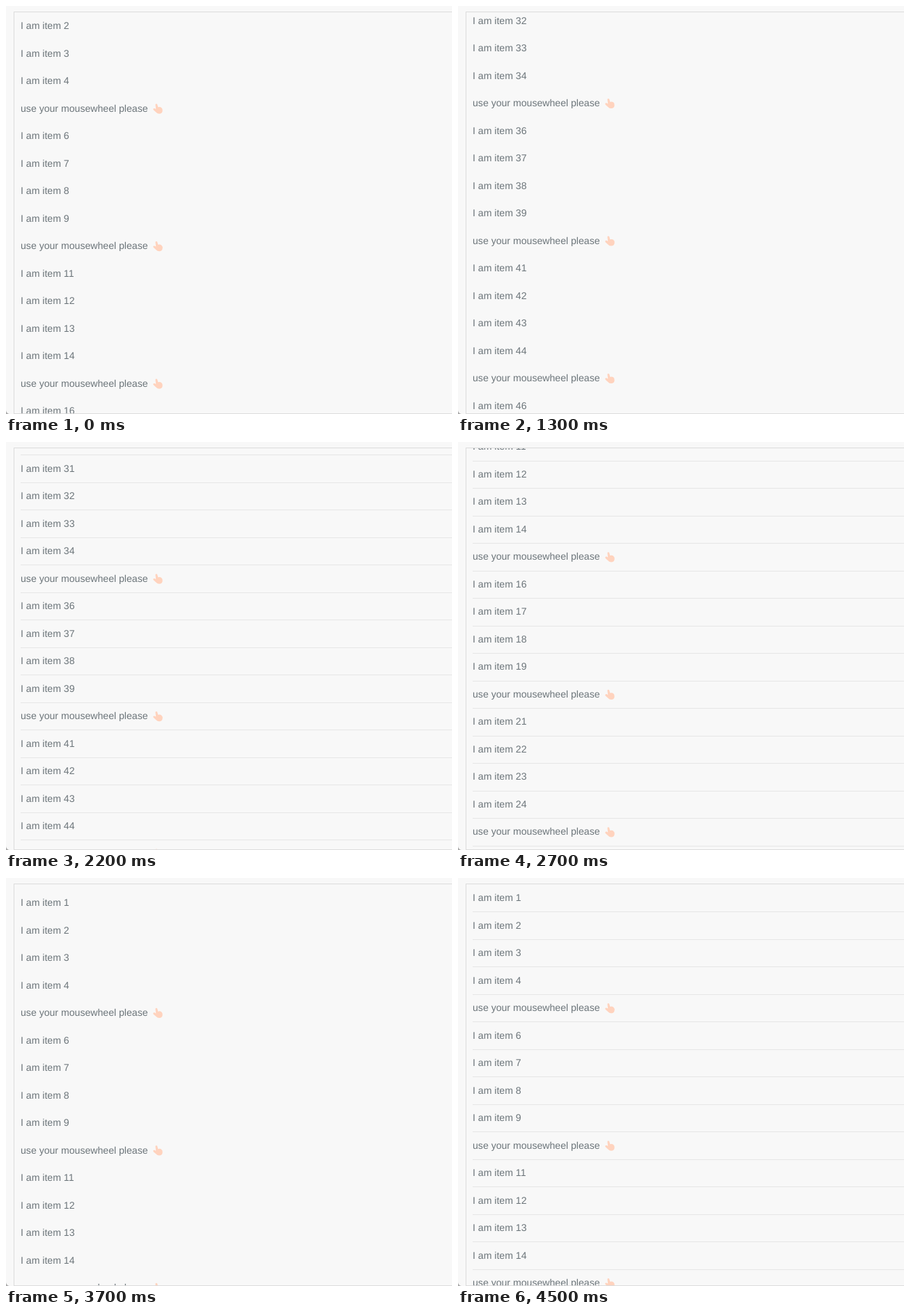
Recreate the animation shown at these times as an HTML page with a canvas. Size 640 by 586 pixels, loop 4600 ms.

```html
<!DOCTYPE html>
<html lang="en">
<head>
<meta charset="utf-8">
<title>Mouse wheel list</title>
<style>
  html, body { margin: 0; width: 100%; height: 100%; overflow: hidden; background: #f8f8f8; }
  canvas { display: block; }
</style>
</head>
<body>
<canvas id="stage" width="640" height="586"></canvas>
<script>
const ctx = document.getElementById('stage').getContext('2d');
const LOOP = 4600, STEP = 100, PITCH = 39.5, FIRST = 29, COUNT = 50;

const easeIn = power => u => u ** power;
const easeOut = power => u => 1 - (1 - u) ** power;
const BOTTOM = COUNT * PITCH - 519;

// Each move carries the scroll offset on from where the last one ended.
const moves = [
  { end: 300, to: PITCH, ease: easeIn(1) },
  { end: 800, to: 582, ease: easeIn(1.3) },             // wheel down
  { end: 1700, to: BOTTOM + 20.5, ease: easeOut(1.6) },
  { end: 1900, to: BOTTOM, ease: easeOut(1.5) },        // spring back from the bottom
  { end: 2200, to: 1175.5, ease: easeIn(1.5) },         // wheel up
  { end: 3200, to: 1.8, ease: easeOut(1.5) },
  { end: 3400, to: 0, ease: easeOut(1.5) },
  { end: 3600, to: 0, ease: easeIn(1) },
  { end: 4000, to: -19.5, ease: easeOut(1.5) },         // pull past the top and spring back
  { end: 4500, to: 0, ease: easeOut(2.8) },
  { end: LOOP, to: 0, ease: easeIn(1) }
];

function scrollAt(t) {
  let start = 0, from = PITCH;
  for (const { end, to, ease } of moves) {
    if (t < end) return from + (to - from) * ease((t - start) / (end - start));
    start = end;
    from = to;
  }
  return from;
}

const hand = new Path2D(
  'M3.4 -5.6 Q3.4 -7 4.7 -7 Q6 -7 6.3 -5.6 L7.2 -2.2 Q10 -3 12 -1.6 ' +
  'Q14 0 13.6 3.2 Q13 7.2 9 7.2 Q6 7.2 4.2 5 L.6 1.8 Q-.4 .2 1 -.6 Q2.6 -.8 4.2 .6 Z');

function drawHand(x, y) {
  ctx.save();
  ctx.translate(x, y);
  ctx.fillStyle = '#ffd3be';
  ctx.fill(hand);
  ctx.restore();
}

function drawText(text, x, y, color) {
  ctx.fillStyle = color;
  ctx.fillText(text, x, Math.round(y + 4.2));
}

function drawRow(n, y, ruled) {
  const hint = n % 5 === 0;
  drawText(hint ? 'use your mousewheel please' : 'I am item ' + n, 21, y, '#6c757a');
  if (hint) drawHand(211, y);
  if (ruled) {
    ctx.fillStyle = '#e6e6e6';
    ctx.fillRect(21, Math.round(y + 19.4), 619, 1);
  }
}

function draw(t) {
  const scroll = scrollAt(t);
  const ruled = t > 1900 && scroll > -2;
  ctx.fillStyle = '#f8f8f8';
  ctx.fillRect(0, 0, 640, 586);

  ctx.save();
  ctx.beginPath();
  ctx.rect(12, 9, 628, 576);
  ctx.clip();
  ctx.font = '14.1px "Liberation Sans", Arial, sans-serif';
  ctx.textRendering = 'geometricPrecision';
  for (let n = 1; n <= COUNT; n++) {
    const y = FIRST + (n - 1) * PITCH - scroll;
    if (y > -25 && y < 605) drawRow(n, y, ruled);
  }
  drawText('Loading...', 306, FIRST + COUNT * PITCH - scroll + 8.5, '#979b9d');
  ctx.restore();

  // container border and the window's rounded corner
  ctx.fillStyle = '#dcdcdc';
  ctx.fillRect(11, 8, 629, 1);
  ctx.fillRect(11, 8, 1, 578);
  ctx.fillRect(11, 585, 629, 1);
  ctx.fillStyle = '#a9a9a9';
  ctx.beginPath();
  ctx.moveTo(0, 581);
  ctx.quadraticCurveTo(0.8, 585.2, 5, 586);
  ctx.lineTo(0, 586);
  ctx.fill();
}

const start = performance.now();
function tick() {
  const t = (performance.now() - start) % LOOP;
  draw(Math.floor(t / STEP) * STEP);
  requestAnimationFrame(tick);
}
tick();
</script>
</body>
</html>
```
